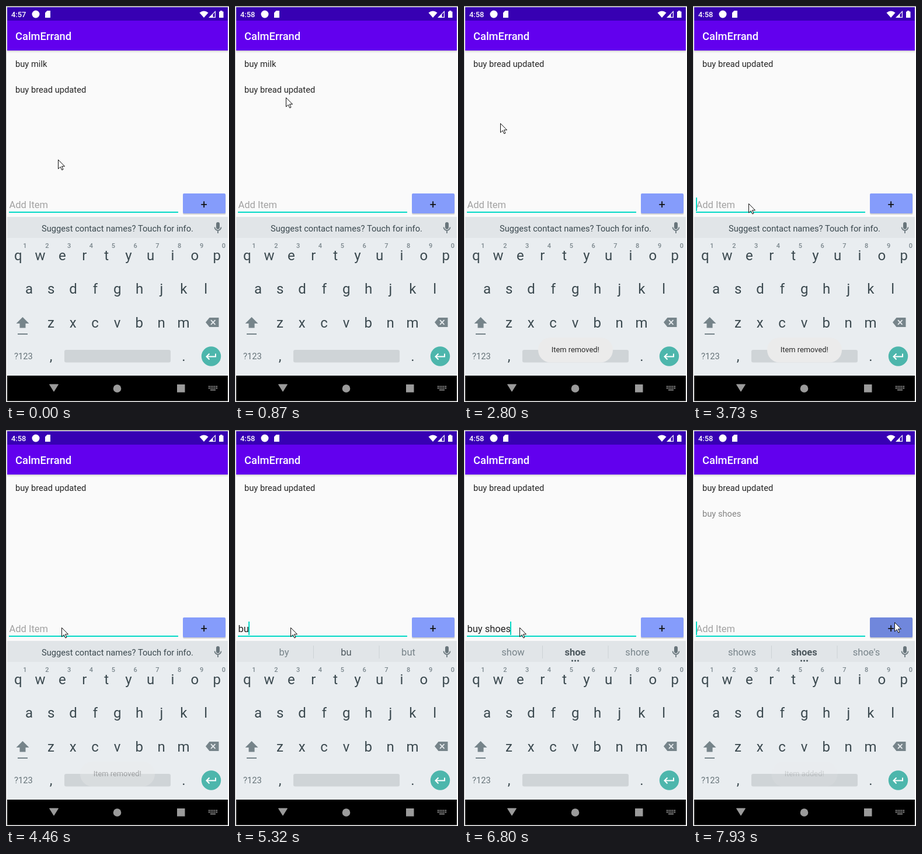
These frames come from a looping animation (382x676 px, 8 s). An HTML page:

```html
<!DOCTYPE html>
<html lang="en">
<head>
<meta charset="utf-8">
<title>To-do list</title>
<style>
  html, body { margin: 0; width: 100%; height: 100%; overflow: hidden; background: #fff; }
  svg { display: block; width: 382px; height: 676px; font-family: Roboto, "Noto Sans", sans-serif; }
  .item { font-size: 14.7px; fill: #252525; }
  .field { font-size: 16.54px; fill: #212121; }
  .key { font-size: 24px; fill: #3b494f; text-anchor: middle; }
  .hint { font-size: 11px; font-weight: 500; fill: #7a868c; text-anchor: middle; }
  .word { font-size: 16.54px; fill: #78848a; text-anchor: middle; }
  .toast { font-size: 12.87px; fill: #2b2b2b; text-anchor: middle; }
</style>
</head>
<body>
<svg viewBox="0 0 382 676">
  <defs>
    <linearGradient id="shade" x2="0" y2="1">
      <stop offset="0" stop-color="#000" stop-opacity=".16"/>
      <stop offset="1" stop-color="#000" stop-opacity="0"/>
    </linearGradient>
  </defs>
  <rect width="382" height="676" fill="#fff"/>
  <rect width="382" height="1" fill="#777"/>
  <rect width="1" height="676" fill="#c4c4c4"/>

  <!-- status bar and title -->
  <rect x="2" y="2" width="378" height="23" fill="#3700b3"/>
  <rect x="2" y="25" width="378" height="51" fill="#6200ee"/>
  <g fill="#fff">
    <text id="clock" x="9" y="19" font-size="12.87" font-weight="500"></text>
    <circle cx="51" cy="14" r="6.5"/>
    <path d="M70.5 8H76V20H67V11.500Z"/>
    <path d="M331.500 11.500Q339 5.500 346.500 11.500L339 20Z"/>
    <path d="M347 20L359 8V20ZM354.500 14V18.800H357.800V10.800Z" fill-rule="evenodd"/>
    <path d="M365 9.500H367V8H370.500V9.500H372.500V20H365Z"/>
    <text x="16" y="57.500" font-size="18.38" font-weight="500">CalmErrand</text>
  </g>

  <!-- list -->
  <rect x="2" y="76" width="378" height="284" fill="#fafafa"/>
  <rect x="2" y="76" width="378" height="4" fill="url(#shade)"/>
  <text id="milk" class="item" x="16" y="104">buy milk</text>
  <text id="bread" class="item" x="16" y="104">buy bread updated</text>
  <text id="shoes" class="item" x="16" y="148">buy shoes</text>

  <!-- input row -->
  <text id="prompt" class="field" x="5.400" y="345" style="fill:#a2a2a2">Add Item</text>
  <text id="typed" class="field" x="5.400" y="345"></text>
  <rect x="5" y="351" width="290" height="2" fill="#03d9c6"/>
  <rect id="caret" x="5" y="327" width="2" height="23" fill="#03d9c6"/>
  <rect x="303" y="321" width="73.500" height="35" rx="2" fill="#000" opacity=".16"/>
  <rect id="button" x="303" y="320" width="73" height="34" rx="2"/>
  <text x="339.300" y="345" font-size="20" text-anchor="middle" fill="#111">+</text>

  <!-- keyboard -->
  <rect x="2" y="360" width="378" height="36" fill="#e1e5e8"/>
  <rect x="2" y="396" width="378" height="235" fill="#e9edf0"/>
  <text id="notice" x="191" y="384.500" font-size="14.7" text-anchor="middle" fill="#3b494f">Suggest contact names? Touch for info.</text>
  <g id="words">
    <path d="M134.500 368V390M247 368V390" stroke="#cdd3d6"/>
    <text class="word" x="84" y="385"></text>
    <text class="word" x="190.500" y="385" style="fill:#4c575d"></text>
    <text class="word" x="297" y="385"></text>
    <g id="dots" fill="#3b494f">
      <circle cx="185.500" cy="394" r="1.400"/><circle cx="190.500" cy="394" r="1.400"/><circle cx="195.500" cy="394" r="1.400"/>
    </g>
  </g>
  <g fill="#68757b">
    <rect x="360" y="369" width="6" height="12" rx="3"/>
    <path d="M357.500 377.500A5.500 5.500 0 0 0 368.500 377.500M363 383V388" fill="none" stroke="#68757b" stroke-width="1.700"/>
  </g>
  <g id="keys"></g>
  <g fill="#76848a">
    <path d="M28.500 531L39.500 542H33.500V549.500H23.500V542H17.500Z"/>
    <rect x="20" y="559" width="17" height="2"/>
    <path d="M348.500 532H364.500V548H348.500L342 540Z"/>
    <path d="M351 536.200L358.500 543.800M358.500 536.200L351 543.800" stroke="#e9edf0" stroke-width="1.800"/>
  </g>
  <text x="14" y="603" font-size="14.7" fill="#667379">?123</text>
  <rect x="100" y="587" width="182" height="21.500" rx="3" fill="#cfd4d7"/>
  <circle cx="351.500" cy="598" r="16.700" fill="#4db6ac"/>
  <path d="M359 593.500V598.500H344M348.500 593.500L343.500 598.500L348.500 603.500" fill="none" stroke="#fff" stroke-width="2"/>

  <!-- navigation bar -->
  <rect x="2" y="631" width="378" height="43.500" fill="#000"/>
  <g fill="#9b9b9b">
    <path d="M74.500 646H89.500L82 658Z" stroke="#9b9b9b" stroke-linejoin="round"/>
    <circle cx="190.500" cy="653" r="6.800"/>
    <rect x="293" y="646" width="13.500" height="13.500"/>
    <path d="M347 649.500H362M347 652.500H362" stroke="#9b9b9b" stroke-width="2" stroke-dasharray="2 1.250"/>
    <path d="M350 655.500H359" stroke="#9b9b9b" stroke-width="1.500"/>
  </g>

  <g id="toast">
    <rect id="pill" y="566" height="42.500" rx="21.250" fill="#ebebeb"/>
    <text id="message" class="toast" x="190.800" y="591"></text>
  </g>
  <path id="cursor" d="M.500 .500V16L4.200 12.600L6.800 18L9 17L6.500 11.700H11.500Z" fill="#fff" stroke="#111"/>
</svg>
<script>
const LOOP = 8000;
const $ = id => document.getElementById(id);
const clamp = v => Math.max(0, Math.min(1, v));
const ramp = (t, from, to) => clamp((t - from) / (to - from));
const show = (el, on) => { el.style.visibility = on ? 'visible' : 'hidden'; };

// Bursts of repaints: start, count (120 ms apart).
const bursts = [[0, 4], [510, 5], [1140, 3], [1530, 1], [2030, 1], [2320, 5], [2950, 1],
  [3090, 1], [3360, 2], [3730, 2], [4220, 7], [5060, 2], [5320, 2], [5700, 8], [6680, 3], [7450, 5]];
const ticks = bursts.flatMap(([start, n]) => Array.from({ length: n }, (_, i) => start + i * 120));

const path = [[120, 89, 262], [360, 89, 264], [510, 91, 258], [750, 101, 200], [990, 72, 112],
  [1140, 66, 108], [1380, 56, 100], [2440, 56, 100], [2800, 62, 200], [2950, 93, 334],
  [3090, 95, 343], [3360, 95, 343], [3480, 95, 337], [7380, 95, 337], [7690, 345, 328]];

// Times at which the caret toggles, starting hidden.
const blinks = [240, 510, 990, 1530, 2030, 2560, 2950, 3480, 3730, 4220, 4700, 5700, 6060];

const line = 'buy shoes';
const strokes = [4820, 5060, 6060, 6180, 6300, 6420, 6540, 6680, 6800];
const guesses = [
  [4940, 'by b but'], [5180, 'by bu but'], [6180, 'but buy buys'], [6300, 'the some a'],
  [6420, 'so s she'], [6540, 'she sh should'], [6680, 'show sho should'],
  [6800, 'show shoe shore'], [6920, "shows shoes shoe's"]];

const addText = (cls, x, y, s) => `<text class="${cls}" x="${x}" y="${y}">${s}</text>`;
const row = (cls, letters, x, y) => [...letters].map((c, i) => addText(cls, x + i * 37.82, y, c)).join('');
$('keys').innerHTML = row('key', 'qwertyuiop', 20.8, 433.5) + row('hint', '1234567890', 32.5, 413) +
  row('key', 'asdfghjkl', 39.5, 491) + row('key', 'zxcvbnm', 77, 549) +
  addText('key', 77, 606, ',') + addText('key', 304.5, 606, '.');

const slots = $('words').querySelectorAll('text');

function cursorAt(t) {
  const i = path.findIndex(p => p[0] > t);
  if (i === 0) return path[0].slice(1);
  if (i < 0) return path[path.length - 1].slice(1);
  const [a, b] = [path[i - 1], path[i]];
  const k = ramp(t, a[0], b[0]);
  return [1, 2].map(n => Math.round(a[n] + (b[n] - a[n]) * k));
}

function drawToast(text, width, alpha) {
  $('toast').style.opacity = alpha;
  $('message').textContent = text;
  $('pill').setAttribute('x', 191 - width / 2);
  $('pill').setAttribute('width', width);
}

function draw(t) {
  const sent = t >= 7810;
  const typed = sent ? '' : line.slice(0, strokes.filter(s => s <= t).length);

  $('clock').textContent = t < 750 ? '4:57' : '4:58';
  $('cursor').setAttribute('transform', `translate(${cursorAt(t)})`);

  $('milk').style.opacity = 1 - ramp(t, 2300, 2440);
  $('bread').setAttribute('y', 148 - 44 * ramp(t, 2440, 2680));
  $('shoes').style.opacity = 0.55 * ramp(t, 7810, 7930);

  $('typed').textContent = typed;
  show($('prompt'), !typed);
  show($('caret'), blinks.filter(b => b <= t).length % 2);
  $('caret').setAttribute('x', typed ? Math.round(4.6 + $('typed').getComputedTextLength()) : 5);
  $('button').setAttribute('fill', sent ? '#7087dc' : '#859cfb');

  const guess = guesses.filter(g => g[0] <= t).pop();
  show($('notice'), !guess);
  $('words').style.display = guess ? '' : 'none';
  show($('dots'), t >= 5440);
  if (guess) guess[1].split(' ').forEach((w, i) => { slots[i].textContent = w; });
  slots[1].style.fontWeight = t >= 6800 ? 700 : 400;

  if (t < 7000) drawToast('Item removed!', 128, ramp(t, 2440, 2780) * (1 - ramp(t, 4200, 4600)));
  else drawToast('Item added!', 113, 0.15 * ramp(t, 7810, 7930));
}

let last = -1;
function frame() {
  const now = performance.now() % LOOP;
  const t = ticks.filter(v => v <= now).pop();
  if (t !== last) draw(last = t);
  requestAnimationFrame(frame);
}
frame();
</script>
</body>
</html>
```
